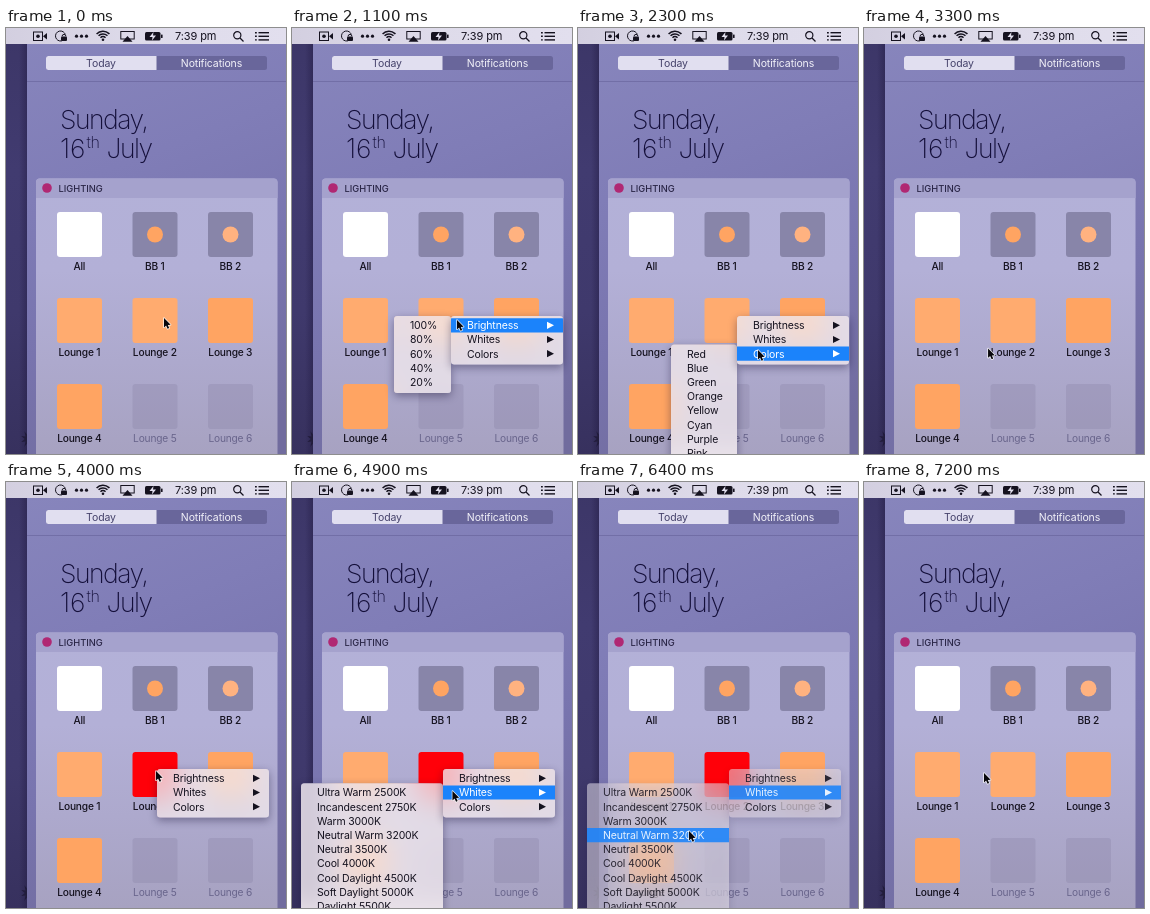
An HTML page with a canvas that plays this animation: 280x426 px, repeating every 7400 ms.

```html
<!DOCTYPE html>
<html lang="en">
<head>
<meta charset="utf-8">
<title>Lighting widget</title>
<style>
html, body { margin: 0; width: 100%; height: 100%; overflow: hidden; background: #3d3868; }
canvas { display: block; width: 280px; height: 426px; }
</style>
</head>
<body>
<canvas id="stage" width="280" height="426"></canvas>
<script>
const W = 280, H = 426, LOOP = 7400, STEP = 100;
const ROW = 14.2, PAD = 2.2, MENU_W = 112;
const FONT = 'Inter, "Open Sans", sans-serif';
const INK = '#15121f', BLUE = '#1b83fb', ORANGE = '#ffa462', PEACH = '#ffab6f', RED = '#ff0009';

const stage = document.getElementById('stage').getContext('2d');
const back = document.createElement('canvas');
back.width = W;
back.height = H;
const scene = back.getContext('2d');

const ITEMS = ['Brightness', 'Whites', 'Colors'];
const SUBS = [
  { w: 57, items: [100, 80, 60, 40, 20].map(n => n + '%') },
  { w: 142, items: ['Ultra Warm 2500K', 'Incandescent 2750K', 'Warm 3000K', 'Neutral Warm 3200K',
    'Neutral 3500K', 'Cool 4000K', 'Cool Daylight 4500K', 'Soft Daylight 5000K', 'Daylight 5500K'] },
  { w: 66, items: ['Red', 'Blue', 'Green', 'Orange', 'Yellow', 'Cyan', 'Purple', 'Pink'] }
];

// row: the item whose submenu is finally used
const MENUS = [
  { x: 159, y: 288, open: 500, close: 3100, row: 2 },
  { x: 151, y: 287, open: 4000, close: 6400, row: 1 }
];

// pointer glides: start, end, x, y
const HOME = [158, 290];
const GLIDES = [
  [700, 1000, 165, 292], [1500, 1750, 172, 308], [1900, 2200, 180, 322], [2500, 2800, 122, 323],
  [3200, 3800, 150, 289], [4300, 4500, 165, 293], [4600, 4800, 165, 309], [4800, 5200, 136, 309],
  [5300, 5700, 120, 317], [5700, 6000, 111, 349], [6500, 7100, 120, 291]
];

function pointerAt(t) {
  let [x, y] = HOME;
  for (const [from, to, tx, ty] of GLIDES) {
    const p = Math.min(1, Math.max(0, (t - from) / (to - from))), e = p * p * (3 - 2 * p);
    x += (tx - x) * e;
    y += (ty - y) * e;
  }
  return [x, y];
}

function box(c, x, y, w, h, r, fill) {
  c.beginPath();
  c.roundRect(x, y, w, h, r);
  c.fillStyle = fill;
  c.fill();
}

function disc(c, x, y, r, fill) {
  c.beginPath();
  c.arc(x, y, r, 0, Math.PI * 2);
  c.fillStyle = fill;
  c.fill();
}

function arc(c, x, y, r, from, to) {
  c.beginPath();
  c.arc(x, y, r, from * Math.PI, to * Math.PI);
  c.stroke();
}

function shape(c, points, fill) {
  c.beginPath();
  for (const [x, y] of points) c.lineTo(x, y);
  c.closePath();
  c.fillStyle = fill;
  c.fill();
}

function text(c, str, x, y, o = {}) {
  c.font = `${o.weight || 400} ${o.size || 10.5}px ${FONT}`;
  c.letterSpacing = (o.gap || 0) + 'px';
  c.textAlign = o.align || 'left';
  c.fillStyle = o.fill || INK;
  c.fillText(str, x, y);
}

function fade(c, x0, y0, x1, y1, ...colors) {
  const g = c.createLinearGradient(x0, y0, x1, y1);
  colors.forEach((col, i) => g.addColorStop(i / (colors.length - 1), col));
  return g;
}

function drawMenuBar(c) {
  box(c, 0, 0, W, 16, 0, fade(c, 0, 0, W, 0, '#d3cfe0', '#dedbea', '#e2dfee'));
  c.strokeStyle = INK;
  c.lineWidth = 1;

  // recorder
  c.strokeRect(27.5, 4, 9, 8.5);
  disc(c, 32, 8.2, 1.8, INK);
  shape(c, [[37, 8.2], [41, 5], [41, 11.5]], INK);

  // padlock in a ring
  arc(c, 54.5, 8, 5, 0.3, 1.9);
  box(c, 55, 8.5, 6, 4.5, 1, INK);
  arc(c, 58, 8.3, 1.9, 1, 2);

  // wireless
  c.lineWidth = 1.5;
  for (let r = 3.4; r < 10; r += 2.7) arc(c, 97, 12, r, -0.76, -0.24);
  disc(c, 97, 11.8, 1.3, INK);

  // display
  c.lineWidth = 1;
  c.strokeRect(114.8, 3.5, 13.4, 7.5);
  shape(c, [[121.5, 8], [126.5, 13.8], [116.5, 13.8]], INK);

  // battery
  box(c, 139, 4, 15.5, 8.5, 1.5, INK);
  box(c, 155, 6.5, 1.6, 3.4, 0.5, INK);
  shape(c, [[147.5, 4], [143.5, 9], [146.5, 9], [146, 12.5], [150, 7.5], [147, 7.5]], '#e2dfee');

  text(c, '7:39 pm', 169, 12, { size: 11, gap: -0.1 });

  // search
  c.lineWidth = 1.2;
  arc(c, 231.3, 7.3, 3.6, 0, 2);
  c.beginPath();
  c.moveTo(234, 10);
  c.lineTo(237.5, 13.5);
  c.stroke();

  for (let i = 0; i < 3; i++) {
    disc(c, 70.5 + i * 5, 8.2, 1.6, INK);
    box(c, 249, 4 + i * 3.6, 1.8, 1.4, 0, INK);
    box(c, 252.5, 4 + i * 3.6, 10.5, 1.4, 0, INK);
  }
}

function drawHeader(c) {
  box(c, 40, 28, 221, 14, 2.5, '#69669b');
  box(c, 40, 28, 110.5, 14, [2.5, 0, 0, 2.5], '#e1dff0');
  text(c, 'Today', 95, 38.8, { align: 'center', fill: '#45426b', gap: -0.1 });
  text(c, 'Notifications', 205.5, 38.8, { align: 'center', fill: '#f3f2fa', gap: -0.1 });
  box(c, 21, 53, W - 21, 1, 0, 'rgba(70,64,120,.3)');

  const big = { size: 26.5, weight: 250, gap: -1.5, fill: '#140f3a' };
  text(c, 'Sunday,', 54, 101, big);
  text(c, '16', 54, 130, { ...big, gap: 0 });
  text(c, 'th', 80.5, 120, { ...big, size: 16, gap: -0.4 });
  text(c, 'July', 100.5, 130, big);
}

function drawTile(c, i, red) {
  const x = 51 + (i % 3) * 75.5, y = 184 + Math.floor(i / 3) * 86;
  const off = i > 6, spot = i === 1 || i === 2;
  const lit = i === 4 && red ? RED : i < 5 ? PEACH : ORANGE;
  const fill = i === 0 ? '#fff' : spot ? '#8885a9' : off ? 'rgba(128,122,158,.28)' : lit;
  const label = i === 0 ? 'All' : spot ? 'BB ' + i : 'Lounge ' + (i - 2);
  box(c, x, y, 45, 45, 3, fill);
  if (spot) disc(c, x + 22.5, y + 22.5, 8, i === 1 ? ORANGE : '#ffb280');
  text(c, label, x + 22.3, y + 57.7, {
    size: 10.2, gap: -0.2, weight: off ? 400 : 500, align: 'center', fill: off ? '#69658c' : INK
  });
}

function drawScene(c, red) {
  box(c, 0, 0, W, H, 0, fade(c, 0, 0, 0, H, '#3c3667', '#413b70', '#3f396c', '#37315e'));
  box(c, 13, 16, 8, H - 16, 0, fade(c, 13, 0, 21, 0, 'rgba(25,18,55,0)', 'rgba(25,18,55,.35)'));

  // dark shrub beside the panel
  const spikes = Array.from({ length: 18 }, (_, i) => {
    const a = i * Math.PI / 9, r = i % 2 ? 4 : 9;
    return [22 + r * Math.cos(a) * 0.8, 411 + r * Math.sin(a)];
  });
  shape(c, spikes, '#211c3b');

  box(c, 21, 16, W - 21, H - 16, 0, fade(c, 21, 16, 180, H, '#8785bc', '#807db7', '#7874ae', '#716c9e'));
  drawMenuBar(c);
  drawHeader(c);

  box(c, 30, 150.5, 241.5, H - 150, [4, 4, 0, 0], fade(c, 0, 150, 0, H, '#b3b1d8', '#b3b0d7', '#ada9cd', '#a7a2c1'));
  box(c, 30, 150.5, 241.5, 19.5, [4, 4, 0, 0], '#a5a2cd');
  disc(c, 41, 160, 4.8, '#b02873');
  text(c, 'LIGHTING', 52.5, 163.5, { size: 9.3, weight: 500, fill: '#2b2748' });
  for (let i = 0; i < 9; i++) drawTile(c, i, red);
}

function drawMenu(c, x, y, w, items, active, alpha, arrows) {
  const h = items.length * ROW + 6;
  c.save();
  c.globalAlpha = alpha;
  c.shadowColor = 'rgba(20,15,50,.4)';
  c.shadowBlur = 8;
  c.shadowOffsetY = 3;
  box(c, x, y, w, h, 3.5, '#e0dbe6');
  c.shadowColor = 'transparent';

  // frosted backdrop
  c.beginPath();
  c.roundRect(x, y, w, h, 3.5);
  c.clip();
  c.filter = 'blur(14px)';
  c.drawImage(back, 0, 0);
  c.filter = 'none';
  box(c, x, y, w, h, 0, 'rgba(244,237,241,.75)');

  c.globalAlpha = Math.min(1, alpha * 2.2);
  items.forEach((label, i) => {
    const top = y + PAD + i * ROW, ink = i === active ? '#fff' : INK;
    if (i === active) box(c, x, top, w, ROW, 0, BLUE);
    text(c, label, x + 16, top + 10.9, { gap: -0.15, fill: ink });
    const ax = x + w - 16, ay = top + ROW / 2;
    if (arrows) shape(c, [[ax, ay - 3.6], [ax + 7, ay], [ax, ay + 3.6]], ink);
  });
  c.restore();
}

function drawSession(c, m, t, [px, py]) {
  const gone = t - m.close;
  if (t < m.open || gone >= 200) return;
  const alpha = gone < 0 ? 1 : gone < 100 ? 0.4 : 0.12;
  const hover = top => Math.floor((py - top - PAD) / ROW);
  const inside = px >= m.x;
  const row = inside ? hover(m.y) : t < m.open + 1000 ? -1 : m.row;
  if (row >= 0) {
    const { w, items } = SUBS[row], top = m.y + row * ROW;
    drawMenu(c, m.x - w, top, w, items, inside ? -1 : hover(top), alpha, false);
  }
  drawMenu(c, m.x, m.y, MENU_W, ITEMS, row, alpha, true);
}

function drawPointer(c, [x, y]) {
  c.save();
  c.translate(x, y);
  c.scale(0.92, 0.92);
  c.lineJoin = 'round';
  c.lineWidth = 1.6;
  c.strokeStyle = 'rgba(255,255,255,.85)';
  const arrow = [[0, 0], [0, 10.2], [2.3, 8.1], [3.9, 11.8], [5.6, 11], [4.1, 7.5], [7.2, 7.3]];
  shape(c, arrow, '#08070c');
  c.stroke();
  c.fill();
  c.restore();
}

function draw(t) {
  const tip = pointerAt(t);
  drawScene(scene, t >= 3400 && t < 6800);
  stage.drawImage(back, 0, 0);
  for (const m of MENUS) drawSession(stage, m, t, tip);
  drawPointer(stage, tip);
}

const start = performance.now();
function tick() {
  const t = (performance.now() - start) % LOOP;
  draw(Math.floor(t / STEP) * STEP);
  requestAnimationFrame(tick);
}
tick();
</script>
</body>
</html>
```
